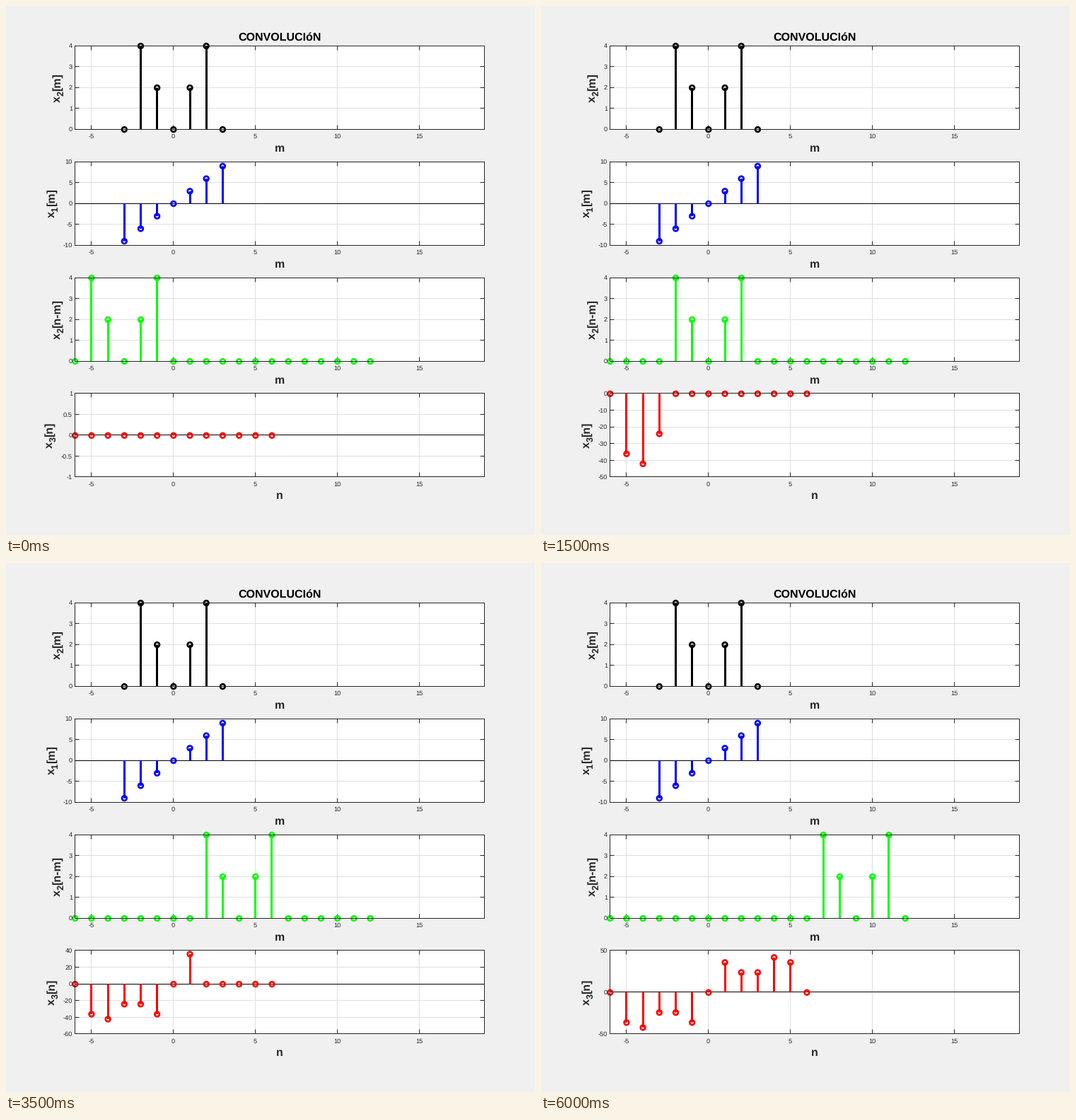
Write a matplotlib script that moves like this. It is 748x748 px and loops after 6500 ms.

```python
import numpy as np
import matplotlib.pyplot as plt
from matplotlib.animation import FuncAnimation

SIZE, DPI = 748, 100
PT = 72 / DPI  # points per pixel
LEFT, WIDTH, HEIGHT = 97.24, 579.6, 118
TOPS = (56.1, 220, 384, 547.8)
X_MIN, X_MAX = -6, 19
DARK, GRID = "#262626", "#dfdfdf"
TICK_PX, LABEL_PX, SUB_PX = 9.33, 16, 12.8

# Advance widths in em, used to centre the labels
THIN = {"-": .333, "[": .333, "]": .333, ".": .278, "m": .889, "n": .611}

# First step, lower limit, upper limit and tick spacing of the result panel
SCALES = [(0, -1, 1, .5), (1, -40, 0, 10), (2, -50, 0, 10),
          (7, -60, 40, 20), (10, -50, 50, 50)]

support = np.arange(-3, 4)
x1 = 3 * support
x2 = np.array([0, 4, 2, 0, 2, 4, 0])
x3 = np.convolve(x1, x2)
n_axis = np.arange(-6, 7)
m_axis = np.arange(-6, 13)

plt.rcParams["font.family"] = "Liberation Sans"
plt.rcParams["text.hinting"] = "none"
fig = plt.figure(figsize=(SIZE / DPI, SIZE / DPI), dpi=DPI, facecolor="#f0f0f0")
ax = fig.add_axes([0, 0, 1, 1])
ax.set_xlim(0, SIZE)
ax.set_ylim(SIZE, 0)
ax.axis("off")


def em(text):
    return sum(THIN.get(c, .556) for c in text)


def pixel(v):
    """Centre of the pixel holding v."""
    return np.floor(v + .1) + .5


def px(m):
    return LEFT + (m - X_MIN) * WIDTH / (X_MAX - X_MIN)


def line(xa, ya, xb, yb, color, width=1, z=1):
    return ax.plot([xa, xb], [ya, yb], color=color, lw=width * PT, zorder=z,
                   solid_capstyle="butt", snap=False, clip_on=False)[0]


def write(x, y, text, size, **style):
    opts = dict(color=DARK, ha="center", va="baseline", zorder=7)
    opts.update(style)
    return ax.text(x, y, text, fontsize=size * PT, **opts)


def side_label(top, sub, rest, ticks):
    """Rotated label x_sub[rest], kept clear of the tick labels."""
    x = 82 - TICK_PX * max(em(t) for t in ticks)
    pieces = (("x", LABEL_PX, 0), (sub, SUB_PX, 5), (rest, LABEL_PX, 0))
    y = top + HEIGHT / 2 + sum(em(t) * s for t, s, _ in pieces) / 2
    made = []
    for text, size, drop in pieces:
        made.append(write(x + drop, y, text, size, weight="bold", ha="left",
                          rotation=90, rotation_mode="anchor"))
        y -= em(text) * size
    return made


def frame_box(top, name):
    """White panel with its border, horizontal axis and label."""
    l, r = pixel(LEFT), pixel(LEFT + WIDTH)
    t, b = pixel(top), pixel(top + HEIGHT)
    ax.fill([l, r, r, l], [t, t, b, b], color="white", lw=0, zorder=0)
    for m in range(-5, 16, 5):
        x = pixel(px(m))
        line(x, t, x, b, GRID)
        line(x, t, x, t + 6, DARK, z=2)
        line(x, b, x, b - 6, DARK, z=2)
        write(px(m), top + HEIGHT + 13.2, str(m), TICK_PX)
    ax.plot([l, r, r, l, l], [t, t, b, b, t], color=DARK, lw=PT, zorder=6,
            solid_joinstyle="miter", snap=False)
    write(LEFT + WIDTH / 2, top + HEIGHT + 31.6, name, LABEL_PX, weight="bold")


def scale(top, low, high, step, sub, rest):
    """Horizontal grid, ticks, baseline and side label."""
    l, r = pixel(LEFT), pixel(LEFT + WIDTH)
    values = np.arange(low, high + step / 2, step)
    names = [f"{v:g}" for v in values]
    made = []
    for v, name in zip(values, names):
        y = top + (high - v) / (high - low) * HEIGHT
        row = pixel(y)
        made += [line(l, row, r, row, GRID),
                 line(l, row, l + 6, row, DARK, z=2),
                 line(r, row, r - 6, row, DARK, z=2),
                 write(94, y + 3.3, name, TICK_PX, ha="right")]
        if v == 0:
            made.append(line(l, row, r, row, "black", z=3))
    return made + side_label(top, sub, rest, names)


def stems(top, low, high, xs, ys, color):
    """Stems and rings, centred on pixels rather than on their corners."""
    def py(v):
        return top + (high - v) / (high - low) * HEIGHT + .5

    made = []
    for x, y in zip(px(xs), ys):
        if y:
            mid = np.round(x) + .5
            made.append(line(mid, py(0), mid, py(y), color, 3, 4))
        ring = plt.Circle((x + .5, py(y)), 3.33, fill=False, ec=color,
                          lw=2.67 * PT, zorder=5, clip_on=False)
        made.append(ax.add_patch(ring))
    return made


for top, name in zip(TOPS, "mmmn"):
    frame_box(top, name)
write(LEFT + WIDTH / 2, 49, "CONVOLUCIóN", LABEL_PX, weight="bold", color="black")

scale(TOPS[0], 0, 4, 1, "2", "[m]")
scale(TOPS[1], -10, 10, 5, "1", "[m]")
scale(TOPS[2], 0, 4, 1, "2", "[n-m]")
stems(TOPS[0], 0, 4, support, x2, "black")
stems(TOPS[1], -10, 10, support, x1, "blue")

moving = []


def update(k):
    while moving:
        moving.pop().remove()
    shifted = np.zeros(len(m_axis))
    shifted[k:k + len(x2)] = x2[::-1]
    moving.extend(stems(TOPS[2], 0, 4, m_axis, shifted, "lime"))

    _, low, high, step = [s for s in SCALES if s[0] <= k][-1]
    partial = np.where(np.arange(len(x3)) <= k, x3, 0)
    moving.extend(scale(TOPS[3], low, high, step, "3", "[n]"))
    moving.extend(stems(TOPS[3], low, high, n_axis, partial, "red"))
    return moving


anim = FuncAnimation(fig, update, frames=len(x3), interval=500,
                     init_func=lambda: [], repeat=True, repeat_delay=0)
plt.show()
```
